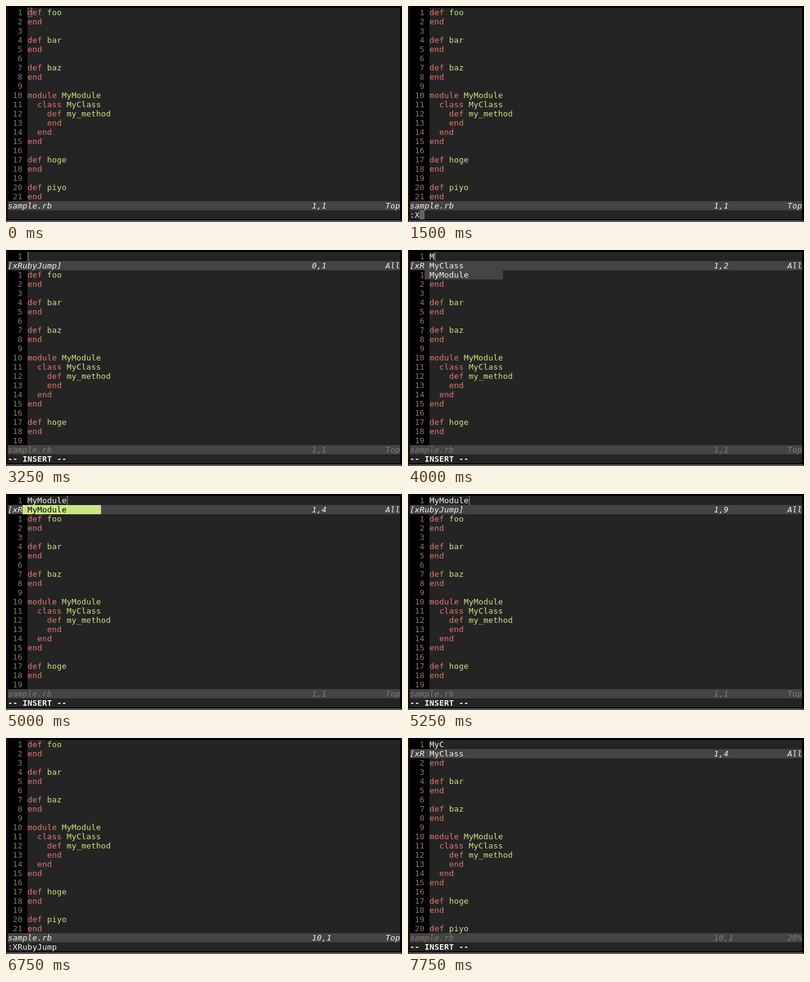
Write an HTML page with a canvas that moves like this. It is 646 px wide and 352 px high and loops after 8 s.

```html
<!DOCTYPE html>
<html>
<head>
<meta charset="utf-8">
<style>
html, body { margin: 0; width: 100%; height: 100%; overflow: hidden; background: #000; }
canvas { display: block; }
</style>
</head>
<body>
<canvas id="screen" width="646" height="352"></canvas>
<script>
const ctx = document.getElementById('screen').getContext('2d');
const CW = 8, CH = 15, PAD = 3, COLS = 80, GUTTER = 4, LOOP = 8000;
const BG = '#242424', FG = '#f6f3e8', BAR = '#444444', DIM = '#857b6f',
      RED = '#e5786d', LIME = '#cae682', CURSOR = '#656565';

const LINES = `def foo
end

def bar
end

def baz
end

module MyModule
  class MyClass
    def my_method
    end
  end
end

def hoge
end

def piyo
end`.split('\n');
const ITEMS = ['MyClass', 'MyModule', 'bar', 'baz', 'foo', 'fuga', 'hoge', 'my_method', 'piyo'];

// Editor states: start time and the values that change from then on.
const CLOSED = { query: null, items: [], cmd: '', caret: '', pick: false };
const OPEN = { query: '', items: [], caret: 'bar', ruler: '0,1' };
const STEPS = [
  [0, { ...CLOSED, caret: 'box', focus: false, top: 1, pos: '1,1', line: 1 }],
  [500, { caret: 'block', focus: true }],
  [1000, { cmd: ':', caret: 'cmd' }],
  [1500, { cmd: ':X' }],
  [1750, { cmd: ':XR' }],
  [2000, { cmd: ':XRubyJump' }],
  [3000, { caret: '' }],
  [3250, OPEN],
  [3750, { items: ITEMS }],
  [4000, typed('M')],
  [4250, typed('My')],
  [4500, typed('MyM')],
  [5000, { query: 'MyModule', pick: true }],
  [5250, { items: [], ruler: '1,9' }],
  [5500, { ...CLOSED, caret: 'block', pos: '10,1', line: 10 }],
  [6000, { cmd: ':', caret: 'cmd' }],
  [6250, { cmd: ':XRubyJump' }],
  [6750, { caret: '' }],
  [7000, { ...OPEN, top: 2 }],
  [7250, { ...typed('M'), caret: 'bar' }],
  [7500, typed('My')],
  [7750, { ...typed('MyC'), caret: '' }]
];

function typed(query) {
  return {
    query,
    items: ITEMS.filter(name => name.startsWith(query)),
    ruler: '1,' + (query.length + 1)
  };
}

const px = col => PAD + col * CW;
const py = row => PAD + row * CH;

function fill(col, row, cols, rows, color) {
  ctx.fillStyle = color;
  ctx.fillRect(px(col), py(row), cols * CW, rows * CH);
}

function text(str, col, row, color = FG, style = '') {
  ctx.font = style + ' 13px "DejaVu Sans Mono", monospace';
  ctx.fillStyle = color;
  [...str].forEach((ch, i) => ctx.fillText(ch, px(col + i), py(row) + 12));
}

function gutter(n, row) {
  text(String(n).padStart(3), 0, row, DIM);
}

function status(row, name, ruler, place, color) {
  fill(0, row, COLS, 1, BAR);
  text(name, 0, row, color, 'italic');
  text(ruler, 62, row, color, 'italic');
  text(place, 77, row, color, 'italic');
}

function code(first, row, end) {
  for (let n = first; row < end; n++, row++) {
    gutter(n, row);
    const [, indent, word, name] = LINES[n - 1].match(/^( *)(\w*) ?(.*)$/);
    const col = GUTTER + indent.length;
    text(word, col, row, RED);
    text(name, col + word.length + 1, row, LIME);
  }
}

function frame(focus) {
  ctx.fillStyle = '#000';
  ctx.fillRect(0, 0, 646, 352);
  ctx.fillStyle = focus ? '#2b3238' : '#2e2e2e';
  ctx.fillRect(1, 1, 1, 350);
  ctx.fillStyle = '#c8c8c8';
  ctx.fillRect(1, 350, 644, 1);
  fill(0, 0, COLS, 23, BG);
  fill(0, 0, GUTTER, 21, '#000');
}

function caret(s) {
  const row = s.line - s.top;
  ctx.fillStyle = ctx.strokeStyle = CURSOR;
  if (s.caret === 'block') {
    fill(GUTTER, row, 1, 1, CURSOR);
    text(LINES[s.line - 1][0], GUTTER, row);
  } else if (s.caret === 'box') {
    ctx.strokeRect(px(GUTTER) + 0.5, py(row) + 0.5, CW - 1, CH - 1);
  } else if (s.caret === 'cmd') {
    fill(s.cmd.length, 22, 1, 1, CURSOR);
  } else if (s.caret === 'bar') {
    ctx.fillRect(px(GUTTER + s.query.length), py(0), 2, CH);
  }
}

function draw(t) {
  const s = Object.assign({}, ...STEPS.filter(step => step[0] <= t).map(step => step[1]));
  const split = s.query !== null;
  frame(s.focus);
  code(s.top, split ? 2 : 0, 21);
  status(21, 'sample.rb', s.pos, s.top > 1 ? '20%' : 'Top', split ? DIM : FG);
  if (split) {
    gutter(1, 0);
    text(s.query, GUTTER, 0);
    status(1, '[xRubyJump]', s.ruler, 'All', FG);
    s.items.forEach((name, i) => {
      fill(3, 1 + i, 16, 1, s.pick ? LIME : BAR);
      text(name, GUTTER, 1 + i, s.pick ? '#000' : FG);
    });
    text('-- INSERT --', 0, 22, FG, 'bold');
  } else {
    text(s.cmd, 0, 22);
  }
  caret(s);
}

const start = performance.now();
function tick() {
  draw((performance.now() - start) % LOOP);
  requestAnimationFrame(tick);
}
tick();
</script>
</body>
</html>
```
